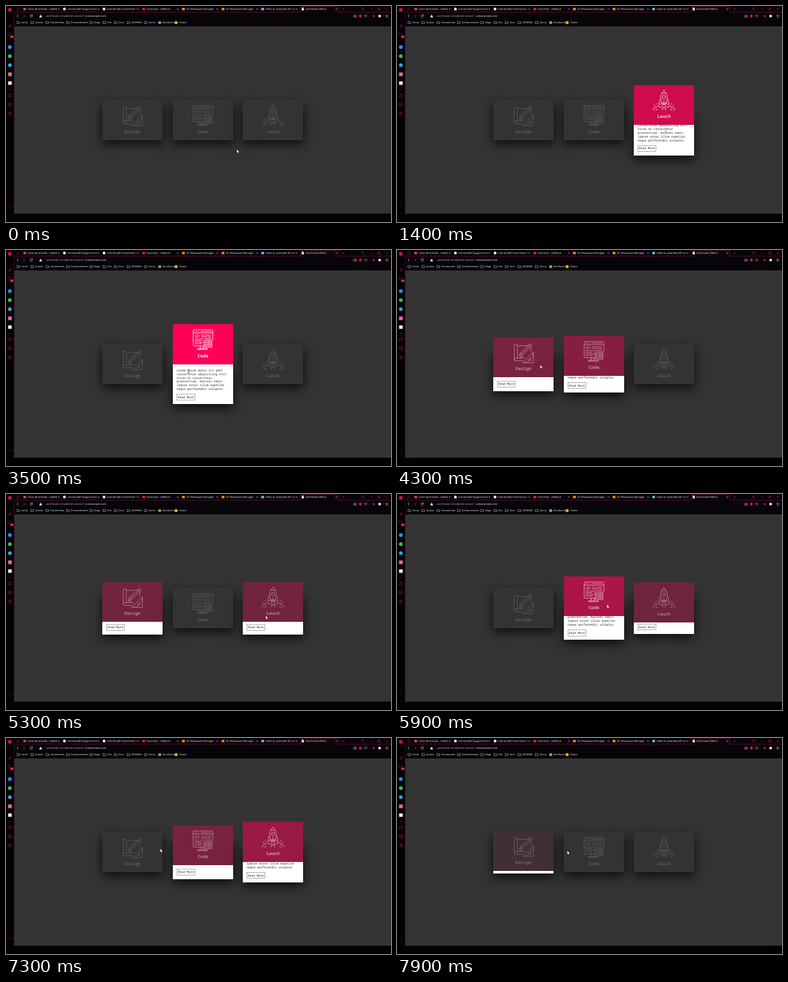
An HTML page with a canvas for the animation above (8000 ms loop, 600 by 338 pixels).

```html
<!DOCTYPE html>
<html lang="en">
<head>
<meta charset="utf-8">
<title>Card Hover Effects</title>
<style>
html, body { margin: 0; width: 100%; height: 100%; overflow: hidden; background: #030106; }
canvas { display: block; width: 600px; height: 338px; }
</style>
</head>
<body>
<canvas id="stage"></canvas>
<script>
const W = 600, H = 338, LOOP = 8000, TICK = 100;
const U = 0.3125; // one page pixel on the stage
const canvas = document.getElementById('stage');
const ctx = canvas.getContext('2d');
const dpr = window.devicePixelRatio || 1;
canvas.width = Math.round(W * dpr);
canvas.height = Math.round(H * dpr);

const SANS = '"Open Sans", "Noto Sans", sans-serif';
const MONO = '"Noto Sans Mono", "DejaVu Sans Mono", monospace';
const RED = '#c41440';

// ---- helpers ----
function text(str, x, y, size, color, font = SANS, weight = 400, align = 'left') {
  const k = 0.25;
  ctx.save();
  ctx.translate(x, y);
  ctx.scale(k, k);
  ctx.font = `${weight} ${size / k}px ${font}`;
  ctx.textAlign = align;
  ctx.fillStyle = color;
  ctx.fillText(str, 0, 0);
  const w = ctx.measureText(str).width * k;
  ctx.restore();
  return w;
}

function rect(x, y, w, h, color) {
  ctx.fillStyle = color;
  ctx.fillRect(x, y, w, h);
}

function disc(x, y, r, color) {
  ctx.fillStyle = color;
  ctx.beginPath();
  ctx.arc(x, y, r, 0, 7);
  ctx.fill();
}

function stroke(d, x, y, color, width = 0.6, k = 1) {
  ctx.save();
  ctx.translate(x, y);
  ctx.scale(k, k);
  ctx.strokeStyle = color;
  ctx.lineWidth = width / k;
  ctx.lineJoin = ctx.lineCap = 'round';
  ctx.stroke(new Path2D(d));
  ctx.restore();
}

// CSS "ease", solved for x by bisection
function ease(x) {
  if (x <= 0) return 0;
  if (x >= 1) return 1;
  const bez = (a, b, s) => 3 * a * s * (1 - s) ** 2 + 3 * b * s * s * (1 - s) + s ** 3;
  let lo = 0, hi = 1;
  for (let i = 0; i < 24; i++) {
    const m = (lo + hi) / 2;
    if (bez(0.25, 0.25, m) < x) lo = m; else hi = m;
  }
  return bez(0.1, 1, lo);
}

// ---- hover timing: alternating enter / leave times ----
const cards = [
  { title: 'Design', toggles: [4190, 5097, 6190, 6620, 7300, 7600] },
  { title: 'Code', toggles: [2560, 4130, 5730, 6170, 6640, 6760, 7170, 7285] },
  { title: 'Lauch', toggles: [1170, 2265, 5197, 5690, 6780, 7165] }
];

// Half-second transition; a reversal takes less time when cut short
function openness(toggles, t) {
  let from = 0, to = 0, start = -1e4, dur = 500;
  const at = time => from + (to - from) * ease((time - start) / dur);
  toggles.forEach((time, i) => {
    if (time > t) return;
    const v = at(time), next = 1 - i % 2;
    dur = Math.max(1, 500 * Math.abs(next - v));
    from = v;
    to = next;
    start = time;
  });
  return at(t);
}

// ---- pointer path: time, x, y ----
const path = [
  [0, 359.8, 224.6], [700, 359.8, 224.6], [900, 429, 264], [1000, 429, 264],
  [1200, 424, 234], [1500, 414, 172], [1800, 420, 158], [2000, 412, 170],
  [2200, 380, 232], [2300, 348, 250], [2500, 335, 246], [2600, 325, 232],
  [2900, 310, 200], [3200, 298, 172], [3500, 284.5, 190], [3800, 290, 202],
  [4100, 264, 192], [4200, 236, 186], [4500, 198, 168], [4800, 205, 178],
  [5000, 232, 222], [5100, 256, 240], [5200, 371, 226], [5300, 404.8, 190.5],
  [5500, 412, 176], [5700, 362, 176], [6000, 310, 172], [6150, 266, 174],
  [6200, 241, 175], [6400, 171.5, 174.8], [6600, 236, 174], [6800, 378, 176],
  [7000, 422, 172], [7300, 240.5, 173.5], [7400, 216, 172], [7600, 245, 175],
  [7900, 265.5, 176.7], [8000, 272, 177]
];

function pointerAt(t) {
  let i = 0;
  while (i < path.length - 2 && path[i + 1][0] <= t) i++;
  const [t0, x0, y0] = path[i], [t1, x1, y1] = path[i + 1];
  const k = (t - t0) / (t1 - t0);
  return [x0 + (x1 - x0) * k, y0 + (y1 - y0) * k];
}

// ---- browser window ----
const tabs = [
  ['Caixa de entrada - rafaelb', '#d8473a'],
  ['lumnetra481/page-not-fou', '#f0f0f0'],
  ['lumnetra481/card-hover-f', '#f0f0f0'],
  ['Para fazer - VidNook', '#ee1c25'],
  ['Q7 Workspace Manager', '#f08a1c'],
  ['Q7 Workspace Manager', '#f08a1c'],
  ['Video to animated GIF conv', '#6cb4d8'],
  ['Card Hover Effects', '#f4f4f4']
];
const marks = [
  ['Social', 17.5], ['Quelvo', 39], ['Ferramentas', 62.5], ['Entretenimento', 94.5],
  ['Blogs', 131], ['Dev', 151.5], ['Docs', 169], ['REDMINE', 189], ['Norvo', 216],
  ['MeuRumo', 237.5, '#8d9a3a'], ['Palavix', 263, '#f0a823']
];

function drawTabs() {
  rect(459, 0.5, 59, 10, '#0a060b');
  stroke('M12.5 9.5H459V.5H518.5V9.5H600', 0, 0, '#8a1234', 0.6);
  stroke('M0 0H4M0 1.7H4M0 3.4H4', 16.3, 3.1, '#8e1434', 0.5);
  tabs.forEach(([label, color], i) => {
    const x = 26.8 + i * 61.8;
    if (i === 7) rect(x + 1.4, 2.6, 3.2, 4.4, color);
    else if (i === 1 || i === 2) disc(x + 2.4, 4.8, 2.2, color);
    else rect(x + 0.3, 2.9, 4.3, 3.8, color);
    ctx.save();
    ctx.beginPath();
    ctx.rect(x + 6.5, 0, 46.5, 10);
    ctx.clip();
    text(label, x + 7, 6.2, 3.85, '#fff');
    ctx.restore();
    stroke('M-1-1L1 1M1-1L-1 1', x + 55.4, 4.8, '#d5ccd2', 0.5);
  });
  stroke('M-1.5 0H1.5M0-1.5V1.5', 526, 4.8, RED, 0.5);
  stroke('M1.2 0A1.6 1.6 0 1 1-2 0A1.6 1.6 0 1 1 1.2 0M.8 1.2L2.3 2.6', 556, 4.4, RED);
  stroke('M-1.8 0H1.8', 569, 5.2, RED);
  stroke('M-1.6-.6H.8V1.8H-1.6ZM-.6-.6V-1.7H1.8V.8H.8', 581, 4.8, RED, 0.5);
  stroke('M-1.6-1.6L1.6 1.6M1.6-1.6L-1.6 1.6', 593.5, 4.8, RED);
}

function drawAddress() {
  stroke('M1-1.8L-1 0L1 1.8', 18, 15.7, '#eee');
  stroke('M-1-1.8L1 0L-1 1.8', 28.5, 15.7, '#888');
  stroke('M1.6-1A1.9 1.9 0 1 0 1.9.6M1.8-2V-.8H.6', 39.3, 15.7, '#eee', 0.55);
  ctx.fillStyle = '#f0f0f0';
  ctx.fill(new Path2D('M54 13.4L56.4 17.8H51.6Z'));
  const w = text('card-hover.s3-website-sa-east-1.', 62, 17.3, 4.13, '#c4bec3');
  text('amazonaws.com', 62 + w, 17.3, 4.13, '#fff');
  stroke('M-2.2-1.2H-1L-.6-2H.6L1-1.2H2.2V1.8H-2.2ZM.8.3A.8.8 0 1 1-.8.3A.8.8 0 1 1 .8.3', 544, 15.8, '#ccc', 0.45);
  disc(552.2, 15.8, 2.2, '#e3173e');
  stroke('M0 2L-2-.2A1.1 1.1 0 0 1 0-1.2A1.1 1.1 0 0 1 2-.2Z', 560.5, 15.7, '#ddd', 0.5);
  rect(566.7, 13.2, 0.4, 5, '#4b2634');
  disc(573, 15.8, 1.9, '#8e2435');
  disc(582.3, 15.8, 2.1, '#f0f0f0');
  stroke('M-1.8-1.5H1.8M-1.8 0H1.8M-1.8 1.5H1.8', 593.5, 15.8, '#ccc', 0.5);
}

function drawMarks() {
  marks.forEach(([label, x, color]) => {
    if (color) rect(x - 0.3, 23.8, 4.6, 4.4, color);
    else stroke('M0 0H1.5L2 .6H4V3.4H0Z', x, 24.2, '#e4dee2', 0.5);
    text(label, x + 6.6, 27.3, 3.65, '#fff');
  });
}

function drawSidebar() {
  disc(6, 6, 2.9, RED);
  stroke('M-2 1.6L0-2.2L2.4-1.4L.6 2.2ZM-1 .4H1.4', 6, 31, RED, 0.5);
  stroke('M-2.4-2.2H2.2V1.4H.4L-.8 2.4V1.4H-2.4Z', 5.6, 45, RED, 0.5);
  rect(6.8, 46.4, 4.6, 3.6, '#f02448');
  disc(6, 64.2, 2.9, '#2a8df0');
  disc(6, 78.4, 2.9, '#2fc457');
  disc(6, 92.6, 2.9, '#35a5df');
  rect(3.2, 104, 5.8, 5.8, '#e0699a');
  rect(3.3, 118, 5.6, 5.4, '#efefef');
  rect(4.2, 130.2, 4, 0.6, '#8c1733');
  stroke('M2.6 0A2.6 2.6 0 1 1-2.6 0A2.6 2.6 0 1 1 2.6 0M0-1.6V0L1.2.8', 6, 140, RED, 0.5);
  stroke('M0-2.7L2.5-1.3V1.4L0 2.7L-2.5 1.4V-1.3ZM-2.5-1.3L0 0L2.5-1.3M0 0V2.7', 6, 154, RED, 0.5);
  stroke('M1 0A1 1 0 1 1-1 0A1 1 0 1 1 1 0M-1.3-2.3H1.3L2.6 0L1.3 2.3H-1.3L-2.6 0Z', 6, 168, RED, 0.55);
  for (let i = -1; i < 2; i++) disc(6 + i * 1.9, 313, 0.5, RED);
}

function drawBrowser() {
  rect(0, 0, W, H, '#030106');
  rect(0, 0, W, 10, '#08030a');
  rect(13, 10, 587, 22, '#07040a');
  drawTabs();
  drawAddress();
  drawMarks();
  drawSidebar();
  rect(13, 32, 587, 293, '#333');
  rect(12, 10, 1, 315, '#2c0a18');
}

// ---- cards ----
const icons = [
  // blueprint, pencil, set square
  'M74 14H20V76M20 14A8 8 0 0 0 4 14V84A8 8 0 0 0 12 90H46M20 76H12A8 8 0 0 0 4 84M88 44V26' +
  'M52 76H20M30 64L35 50L84 3L95 13L45 61ZM35 50L45 61M77 10L88 20M40 55L84 14M32 70H48' +
  'M100 46V99H47ZM87 74V87H74ZM93 58H100M93 68H100M62 99V93M72 99V93',
  // window with code, server stack, stand
  'M6 0H94A5 5 0 0 1 99 5V50M99 16H1M1 5A5 5 0 0 1 6 0M1 5V76A5 5 0 0 0 6 81H52M9 8H12M18 8H21M27 8H30M40 8H90' +
  'M15 25L9 31L15 37M26 25L32 31L26 37M23 24L18 38M42 27H56M62 27H88M42 35H70M76 35H88' +
  'M10 46H24M30 46H52M10 54H40M10 62H20M26 62H48M10 70H44M60 44H90' +
  'M56 52H94V64H56ZM56 64V76H94V64M56 76V88H94V76M62 58H66M72 58H88M62 70H66M72 70H88M62 82H66M72 82H88' +
  'M36 81V94M50 81V94M24 94H72V99H24Z',
  // rocket, flames, smoke
  'M50 0C66 14 72 34 62 62H38C28 34 34 14 50 0ZM40 13H60M58 32A8 8 0 1 1 42 32A8 8 0 1 1 58 32' +
  'M34 42C26 48 24 58 26 72L38 62M66 42C74 48 76 58 74 72L62 62M50 48V70M41 62V69H59V62' +
  'M43 69C40 78 46 82 50 90C54 82 60 78 57 69M-2 99C-6 88 4 80 12 85C14 74 28 74 30 84C40 80 46 90 40 99' +
  'M102 99C106 88 96 80 88 85C86 74 72 74 70 84C60 80 54 90 60 99M0 72L6 77M100 72L94 77M12 64V69M88 64V69' +
  'M8 99C8 94 14 92 18 95M92 99C92 94 86 92 82 95'
];
const lorem = [
  'Lorem ipsum dolor sit amet', 'consectetur adipisicing elit.', 'Vitae et consectetur',
  'praesentium, maiores nobis', 'labore error illum repellat', 'neque perferendis voluptas.'
];
const CW = 94, CH = 200 * U, TOP = 116, SLIDE = 100 * U;
const cardX = i => Math.round(150.2 + i * 350 * U);

function drawCard(i, p) {
  const x = cardX(i), mid = x + CW / 2;
  const y1 = TOP + SLIDE * (1 - p), y2 = TOP + SLIDE * (1 + p) + 0.3;
  // whole-pixel edges keep the white panel from showing around a closed card
  const top = Math.round(y1), seam = Math.round(y1 + CH), bottom = Math.round(y2 + CH);

  ctx.save();
  ctx.shadowColor = 'rgba(0,0,0,.8)';
  ctx.shadowBlur = 50 * U * dpr;
  ctx.shadowOffsetY = 20 * U * dpr;
  rect(x, Math.round(y2), CW, bottom - Math.round(y2), '#fff');
  ctx.restore();
  lorem.forEach((line, n) => text(line, x + 6, y2 + 11 + n * 5.86, 4.583, '#222', MONO));
  ctx.strokeStyle = '#333';
  ctx.lineWidth = 0.4;
  ctx.strokeRect(x + 6.3, y2 + 46.9, 28.4, 9.3);
  text('Read More', x + 8, y2 + 53.2, 4.583, '#222', MONO, 500);

  const mix = (a, b) => Math.round(a + (b - a) * p);
  rect(x, top, CW, seam - top, `rgb(${mix(51, 255)},${mix(51, 0)},${mix(51, 87)})`);
  ctx.save();
  ctx.globalAlpha = 0.2 + 0.8 * p;
  stroke(icons[i], mid - 15.6, y1 + 8.8, '#fff', 0.85, U);
  text(cards[i].title, mid, y1 + 51.6, 6.9, '#fff', MONO, 700, 'center');
  ctx.restore();
}

function drawPointer(x, y, levels) {
  const overText = levels.some((p, i) =>
    p > 0.9 && x > cardX(i) + 6 && x < cardX(i) + CW - 6 && y > TOP + CH + 6 && y < TOP + CH + 43);
  if (overText) {
    stroke('M-1-2.6H1M0-2.6V2.6M-1 2.6H1', x, y, '#222', 0.5);
    return;
  }
  const arrow = new Path2D('M0 0V5L1.2 4L2 5.8L2.8 5.4L2 3.7H3.5Z');
  ctx.save();
  ctx.translate(x, y);
  ctx.lineWidth = 0.5;
  ctx.strokeStyle = '#111';
  ctx.stroke(arrow);
  ctx.fillStyle = '#fff';
  ctx.fill(arrow);
  ctx.restore();
}

function draw(t) {
  ctx.setTransform(dpr, 0, 0, dpr, 0, 0);
  ctx.textRendering = 'geometricPrecision';
  drawBrowser();
  const levels = cards.map(c => openness(c.toggles, t));
  levels.forEach((p, i) => drawCard(i, p));
  drawPointer(...pointerAt(t), levels);
}

const begin = performance.now();
let last = -1;
function frame() {
  const t = Math.floor(((performance.now() - begin) % LOOP) / TICK) * TICK;
  if (t !== last) draw(last = t);
  requestAnimationFrame(frame);
}
frame();
</script>
</body>
</html>
```
